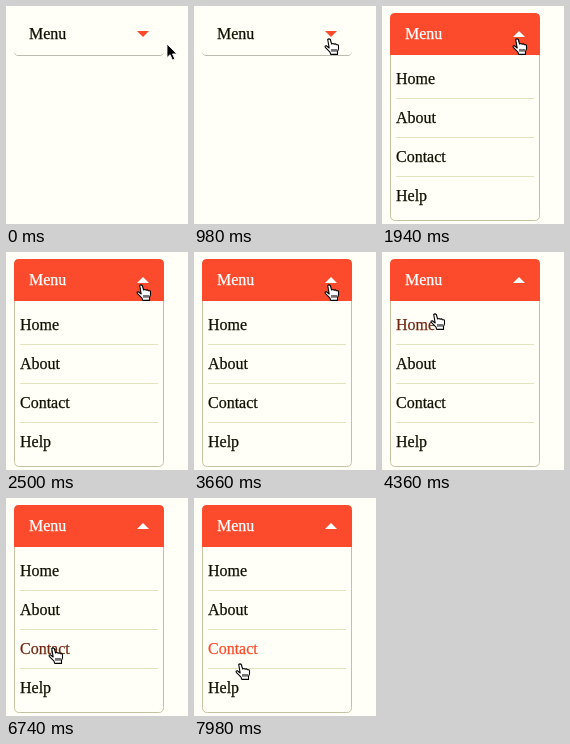
An HTML page for the animation above (8 s loop, 182x218 px).

```html
<!DOCTYPE html>
<html lang="en">
<head>
<meta charset="utf-8">
<title>Dropdown menu</title>
<style>
  html, body { margin: 0; width: 100%; height: 100%; overflow: hidden; background: #fffff8; }
  svg { display: block; width: 182px; height: 218px; }
  text { font: 16px "Liberation Serif", "Times New Roman", serif; stroke-width: .25px; }
</style>
</head>
<body>
<svg viewBox="0 0 182 218">
  <defs>
    <clipPath id="clip"><rect id="reveal" x="8" y="49" width="150" height="0"/></clipPath>
  </defs>
  <path id="shadow" d="M8 44V45Q8 50 13 50H153Q158 50 158 45V44Q158 49 153 49H13Q8 49 8 44Z" fill="#22220a" fill-opacity=".3"/>
  <path id="head"/>
  <text id="title" x="23" y="33">Menu</text>
  <path id="caret"/>
  <g clip-path="url(#clip)">
    <path id="panel" fill="none" stroke="#c2c2a2"/>
    <g id="items"></g>
  </g>
  <path id="arrow" d="M0 0V13.5L3.1 10.7L5.4 16L7.8 15L5.5 9.9H9.8Z" fill="#000" stroke="#fff" stroke-width=".8"/>
  <path id="hand" d="M-1.3 .5Q0 -.8 1.3 .5L2.6 5Q4.2 4 5.1 5.2Q6.7 4.4 7.4 5.8Q9.3 5.3 9.5 7Q10 10 8.5 12.6V15.4H1.7L1 13.2L-3.7 8.4Q-4.5 6.6 -2.6 6.8L.2 9ZM3 10V12.8M5 10V12.8M7 10V12.8"
    fill="#fff" stroke="#000" stroke-width="1.1" stroke-linejoin="round"/>
</svg>
<script>
const LOOP = 8000, FADE = 300, FULL = 166, OPEN = 1450;
const PAGE = [255, 255, 248], ORANGE = [251, 75, 44], INK = [16, 16, 0], WHITE = [255, 255, 255];
const el = id => document.getElementById(id);

// label, hover start, hover end
const items = [
  ['Home', 4278, 5890],
  ['About', 5890, 6400],
  ['Contact', 6658, Infinity],
  ['Help', Infinity, Infinity]
];

// time, x, y of the pointer tip
const track = [
  [0, 161, 38], [220, 162, 46], [380, 162, 46], [840, 135, 33],
  [3900, 135, 33], [4360, 53, 62], [4700, 53, 62], [5400, 48, 86],
  [5750, 48, 86], [6040, 48, 110], [6520, 48, 116], [6740, 47, 150],
  [7200, 47, 151], [7900, 46, 166], [LOOP, 46, 166]
];

const svgNode = (tag, attrs) => {
  const node = document.createElementNS('http://www.w3.org/2000/svg', tag);
  for (const key in attrs) node.setAttribute(key, attrs[key]);
  return el('items').appendChild(node);
};

const labels = items.map(([name], i) => {
  const label = svgNode('text', { x: 14, y: 78 + 39 * i });
  label.textContent = name;
  if (i < 3) svgNode('path', { d: `M14 ${92.5 + 39 * i}H152`, stroke: '#e2e2bc' });
  return label;
});

const clamp = x => Math.min(1, Math.max(0, x));

// cubic-bezier(0, 0, .58, 1)
function easeOut(x) {
  let lo = 0, hi = 1;
  for (let i = 0; i < 20; i++) {
    const s = (lo + hi) / 2;
    if (1.74 * s * s * (1 - s) + s ** 3 < x) lo = s; else hi = s;
  }
  return 3 * lo * lo * (1 - lo) + lo ** 3;
}

const fade = (t, start) => t <= start ? 0 : t >= start + FADE ? 1 : easeOut((t - start) / FADE);
const mix = (a, b, p) => `rgb(${a.map((v, i) => Math.round(v + (b[i] - v) * p))})`;

function paint(text, color) {
  text.setAttribute('fill', color);
  text.setAttribute('stroke', color);
}

function pointer(t) {
  const i = track.findIndex(k => k[0] > t);
  const [t0, x0, y0] = track[i - 1], [t1, x1, y1] = track[i];
  const u = clamp((t - t0) / (t1 - t0)), s = u * u * (3 - 2 * u);
  return [x0 + (x1 - x0) * s, y0 + (y1 - y0) * s];
}

function draw(t) {
  const p = fade(t, OPEN), open = t >= OPEN;
  const r = 5 * (1 - p), height = Math.min(FULL, 500 * p), bottom = 48.5 + height;

  el('shadow').setAttribute('opacity', 1 - p);
  el('head').setAttribute('d',
    `M13 7H153Q158 7 158 12V${49 - r}Q158 49 ${158 - r} 49H${8 + r}Q8 49 8 ${49 - r}V12Q8 7 13 7Z`);
  el('head').setAttribute('fill', mix(PAGE, ORANGE, p));
  paint(el('title'), mix(INK, WHITE, p));
  el('caret').setAttribute('d', open ? 'M131 31H143L137 25Z' : 'M131 25H143L137 31Z');
  el('caret').setAttribute('fill', open ? '#fff' : mix(ORANGE, WHITE, 0));

  el('reveal').setAttribute('height', height);
  el('panel').setAttribute('d',
    `M8.5 49V${bottom - 5}Q8.5 ${bottom} 13.5 ${bottom}H152.5Q157.5 ${bottom} 157.5 ${bottom - 5}V49`);
  items.forEach(([, from, to], i) =>
    paint(labels[i], mix(INK, ORANGE, fade(t, from) * (1 - fade(t, to)))));

  const [x, y] = pointer(t), outside = x > 158;
  for (const [id, shown] of [['arrow', outside], ['hand', !outside]]) {
    el(id).setAttribute('transform', `translate(${x} ${y})`);
    el(id).setAttribute('visibility', shown ? 'visible' : 'hidden');
  }
}

const begin = performance.now();
function tick() {
  draw((performance.now() - begin) % LOOP);
  requestAnimationFrame(tick);
}
tick();
</script>
</body>
</html>
```
